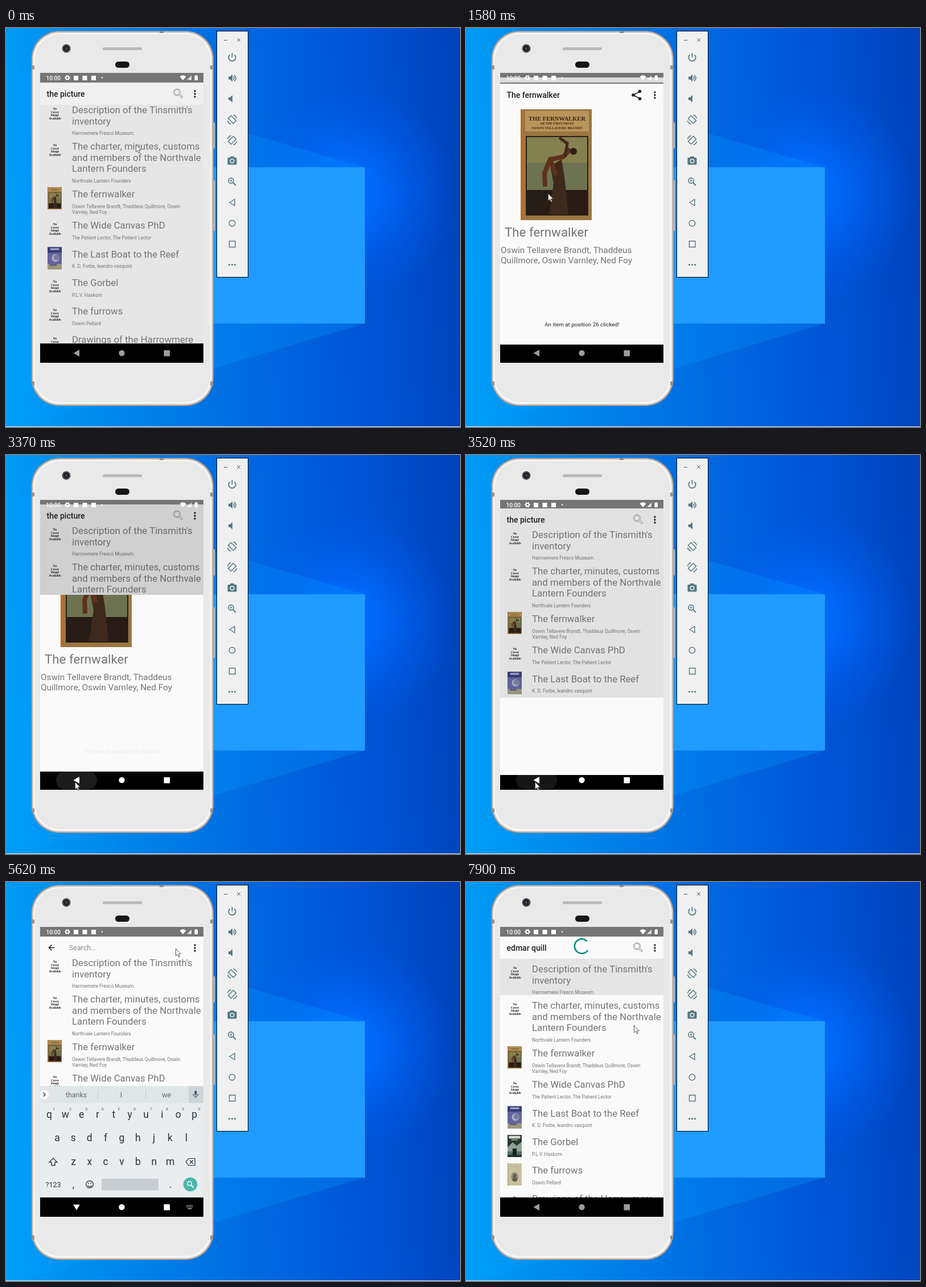
Animation, 798 px wide and 702 px high, one loop 8000 ms. Source, as an HTML page with a canvas:

```html
<!DOCTYPE html>
<html lang="en">
<head>
<meta charset="utf-8">
<title>Book search on a phone emulator</title>
<style>
  html, body { margin: 0; height: 100%; overflow: hidden; }
  canvas { display: block; }
</style>
</head>
<body>
<canvas id="stage" width="798" height="702"></canvas>
<script>
const stage = document.getElementById('stage');
let g = stage.getContext('2d');
const LOOP = 8000, TAU = Math.PI * 2;
const SANS = 'Roboto, sans-serif', SERIF = '"Liberation Serif", serif';
const GREY = '#757575', INK = '#212121', PAPER = '#fafafa', ICON = '#557783';

// Screen bursts: first change, last change, number of changes
const BURSTS = [[150, 630, 5], [1190, 1730, 5], [2030, 2980, 8], [3100, 4080, 8], [4200, 5110, 8],
  [5350, 5350, 1], [5620, 6650, 8], [6800, 7770, 7], [7900, 7900, 1]];
const POINTER = [[30, 228, 205], [630, 144, 291], [1900, 144, 291], [2300, 228, 400], [2660, 150, 545],
  [2830, 109, 591], [2980, 121, 575], [4090, 121, 575], [4460, 292, 114], [4590, 298, 117],
  [7150, 298, 117], [7770, 300, 244], [7900, 295, 252]];

// y is the centre of the first title line, relative to the scrolled list
const BOOKS = [
  { y: 142, title: ["Description of the Tinsmith's", 'inventory'], by: ['Harrowmere Fresco Museum.'] },
  { y: 206, title: ['The charter, minutes, customs', 'and members of the Northvale', 'Lantern Founders'], by: ['Northvale Lantern Founders'] },
  { y: 290, title: ['The fernwalker'], by: ['Oswin Tellavere Brandt, Thaddeus Quillmore, Oswin', 'Varnley, Ned Foy'], cover: 'hunter' },
  { y: 345, title: ['The Wide Canvas PhD'], by: ['The Patient Lector, The Patient Lector'] },
  { y: 395.5, title: ['The Last Boat to the Reef'], by: ['K. D. Forbe, leandro vasquint'], cover: 'moon' },
  { y: 446, title: ['The Gorbel'], by: ['P.L.V. Haskorn'], cover: 'forest', late: true },
  { y: 496, title: ['The furrows'], by: ['Oswin Pellard'], cover: 'portrait', late: true },
  { y: 546, title: ['Drawings of the Harrowmere'], by: [] },
];
const QUERY = 'edmar quill';

const ramp = (t, a, b) => Math.min(1, Math.max(0, (t - a) / (b - a)));
const inOut = p => p < .5 ? 4 * p ** 3 : 1 - 4 * (1 - p) ** 3;

function hold(t) {
  let held = 0;
  for (const [a, b, n] of BURSTS) {
    const step = (b - a) / (n - 1) || 1, late = t + 20 - a;
    if (late >= 0) held = Math.min(b, a + Math.floor(late / step) * step);
  }
  return held;
}

function along(keys, t) {
  const i = keys.findIndex(k => k[0] > t);
  if (i < 1) return keys.at(i).slice(1);
  const [a, x, y] = keys[i - 1], [b, u, v] = keys[i], p = ramp(t, a, b);
  return [Math.round(x + (u - x) * p), Math.round(y + (v - y) * p)];
}

function text(s, x, y, size, color = GREY, weight = 400, align = 'left', family = SANS) {
  g.font = `${weight} ${size}px ${family}`;
  g.fillStyle = color;
  g.textAlign = align;
  g.fillText(s, x, y);
}
function rect(x, y, w, h, color, r = 0) {
  g.fillStyle = color;
  g.beginPath(); g.roundRect(x, y, w, h, r); g.fill();
}
function disc(x, y, r, color, ry = r) {
  g.fillStyle = color;
  g.beginPath(); g.ellipse(x, y, r, ry, 0, 0, TAU); g.fill();
}
function fillPath(d, color) { g.fillStyle = color; g.fill(new Path2D(d)); }
function strokePath(d, color, width = 1.4) {
  g.strokeStyle = color; g.lineWidth = width; g.stroke(new Path2D(d));
}
function ring(x, y, r, color, width = 1.4, a = 0, b = TAU) {
  g.strokeStyle = color; g.lineWidth = width;
  g.beginPath(); g.arc(x, y, r, a, b); g.stroke();
}
function at(x, y, draw, sx = 1, sy = sx, turn = 0) {
  g.save(); g.translate(x, y); g.rotate(turn); g.scale(sx, sy); draw(); g.restore();
}
function clipped(x, y, w, h, draw) {
  g.save(); g.beginPath(); g.rect(x, y, w, h); g.clip(); draw(); g.restore();
}

function wallpaper() {
  const base = g.createLinearGradient(0, 430, 798, 390);
  [['0', '#009df5'], ['.3', '#0080e8'], ['.55', '#0068e0'], ['.8', '#0054d4'], ['1', '#0044bd']]
    .forEach(([p, c]) => base.addColorStop(+p, c));
  rect(0, 0, 798, 702, base);
  const glow = g.createRadialGradient(600, 290, 50, 600, 290, 190);
  glow.addColorStop(0, 'rgba(0,108,255,.85)');
  glow.addColorStop(1, 'rgba(0,90,240,0)');
  rect(300, 0, 498, 702, glow);
  fillPath('M630 245L0 62V702H20L630 520Z', 'rgba(0,155,255,.27)');
  rect(356, 245, 275, 275, '#209bff');
  rect(0, 701, 798, 1, '#e8f0f8');
}

function phoneBody() {
  rect(363, 166, 4, 46, '#c9c3c0', 1);
  rect(363, 268, 4, 89, '#c9c3c0', 1);
  rect(44.5, 5, 320.5, 660, '#a2948c', 49);
  rect(46, 6.5, 317.5, 657, '#d3c9c4', 48);
  rect(48, 8.5, 313.5, 653, '#f8f8f8', 46);
  rect(50.5, 11, 308.5, 647, '#e9e9e9', 44);
  rect(270, 5, 7, 4, '#8b8b8b');
  for (const y of [66, 622]) { rect(45, y, 5, 7, '#929292'); rect(359, y, 5, 7, '#929292'); }
  disc(106, 36, 7.5, '#4a4a4a'); disc(106, 36, 5, '#1d1d22'); disc(106, 36, 2, '#49506a');
  rect(170, 34, 69, 5, '#b9b9b9', 2.5);
  rect(192, 59, 25, 11, '#161616', 5.5);
}

function speaker(y, waves) {
  fillPath(`M391 ${y - 2.5}h3l4-4v13l-4-4h-3z`, ICON);
  if (waves) { ring(398, y, 3, ICON, 1.6, -1, 1); ring(398, y, 6, ICON, 1.6, -1.1, 1.1); }
}
function rotateIcon(y, mirror) {
  at(397.5, y, () => {
    strokePath('M-7-2L-2-7L7 2L2 7Z', ICON, 1.5);
    strokePath('M-8 2A8 8 0 0 0-2 8M2-8A8 8 0 0 1 8-2', ICON, 1.4);
  }, mirror, 1);
}
function emulatorBar() {
  rect(370, 5, 56, 434, '#000');
  rect(371, 6, 54, 432, '#f0f0f0');
  strokePath('M383 21.5h6M406 18l6 6m0-6l-6 6', '#555', 1);
  ring(397.5, 52, 6.2, ICON, 1.8, -.9, Math.PI + .9);
  strokePath('M397.500 44v7.500', ICON, 1.8);
  speaker(88, true); speaker(124.5, false);
  rotateIcon(161, 1); rotateIcon(197.5, -1);
  rect(389.5, 228, 16, 12.5, ICON, 1.5); rect(394, 226, 7, 3, ICON);
  disc(397.5, 234, 4, '#f0f0f0'); disc(397.5, 234, 2.5, ICON);
  ring(395.5, 268.5, 4.6, ICON, 1.6);
  strokePath('M399 272l5 5', ICON, 2);
  strokePath('M393 268.5h5m-2.5-2.5v5', ICON, 1);
  strokePath('M402 301.5v11l-9-5.5z', ICON);
  ring(397.5, 343.5, 5.3, ICON);
  strokePath('M392.500 375h10.500v10.500h-10.500z', ICON);
  for (const x of [392.5, 397.5, 402.5]) disc(x, 416.5, 1.6, ICON);
}

// Covers are drawn in a 125 x 195 box
const covers = {
  hunter() {
    rect(0, 0, 125, 195, '#9a7642'); rect(0, 0, 4, 195, '#b96f24'); rect(8, 3, 112, 36, '#b8955a');
    text('THE FERNWALKER', 64, 20, 10.5, '#3c2814', 700, 'center', SERIF);
    text('OR THE FIRST FROST', 64, 26.5, 5.6, '#3c2814', 700, 'center', SERIF);
    text('OSWIN TELLAVERE BRANDT', 64, 34.5, 6.3, '#3c2814', 700, 'center', SERIF);
    rect(9, 47, 110, 140, '#2a2016'); rect(11, 49, 106, 136, '#85814f');
    rect(11, 94, 106, 50, '#6d7350'); rect(11, 142, 106, 43, '#281c16');
    fillPath('M52 100L72 88L78 125L84 185H50L58 130Z', '#3f291b');
    strokePath('M88 70L74 84L52 88L42 112L43 136M52 88L62 116', '#5f311d', 8);
    strokePath('M78 84L82 60L68 50', '#432719', 5);
    disc(93, 74, 6, '#2c1b15');
  },
  moon() {
    rect(0, 0, 125, 195, '#62639d'); rect(0, 0, 125, 48, '#383b73'); rect(24, 10, 78, 16, '#a4a7c8');
    disc(70, 96, 34, '#a6a9bd'); disc(80, 90, 25, '#777c9d');
    rect(0, 150, 125, 45, '#9d987a'); rect(20, 150, 60, 15, '#555a84');
  },
  forest() {
    rect(0, 0, 125, 195, '#28362d'); rect(12, 8, 100, 24, '#d4d8cc'); rect(32, 38, 60, 10, '#98a697');
    fillPath('M0 110L45 65L80 95L125 60V150H0Z', '#8fa097');
    rect(0, 145, 125, 30, '#566e62'); rect(45, 120, 35, 60, '#17241e');
  },
  portrait() {
    rect(0, 0, 125, 195, '#c9c0a1'); rect(0, 0, 8, 195, '#ada383'); rect(25, 25, 75, 4, '#a2987b');
    disc(63, 120, 32, '#938b75', 42); disc(63, 110, 13, '#625d51', 17); disc(63, 142, 22, '#625d51', 17);
  },
};
function cover(name, x, y, scale) { at(x, y, covers[name], scale); }

function overflowDots() { for (const y of [111, 116, 121]) disc(332, y, 1.7, INK); }

function toolbar(t, color) {
  const searching = t >= 4590 && t < 7250;
  rect(60, 96, 287, 39, color);
  overflowDots();
  if (!searching) {
    text(t < 4590 ? 'the picture' : QUERY, 71.5, 121, 14, INK, 500);
    ring(300.5, 113, 5.2, '#888', 2.4); ring(300.5, 113, 5.2, '#ededed', 1);
    strokePath('M304.500 117l5.500 5.500', '#888', 3.6); strokePath('M304.500 117l5 5', '#ededed', 2);
    return;
  }
  strokePath('M85.500 115.500H76M80.500 110.500l-5 5l5 5', INK, 1.6);
  const typed = queryAt(t);
  if (!typed) text('Search…', 110.5, 120, 12.6, '#8b8b8b');
  text(typed, 110.5, 120, 12.6, INK);
  const end = 110.5 + g.measureText(typed).width;
  if (typed) {
    const from = 110.5 + g.measureText(typed.slice(0, typed.lastIndexOf(' ') + 1)).width;
    rect(from, 121.5, end - from, 1, INK);
    strokePath('M295 111l9 9m0-9l-9 9', INK, 1.7);
  }
  if (t < 5350 || t > 5700) rect(end, 107, 1.5, 17, '#26a69a');
}

function queryAt(t) { return QUERY.slice(0, Math.floor(ramp(t, 5620, 6650) * QUERY.length)); }

function bookRow(book, shift, t) {
  const y = book.y + shift;
  book.title.forEach((s, i) => text(s, 116, y + 6 + i * 19.5, 16.75));
  const below = y + 24.5 + (book.title.length - 1) * 19.5;
  book.by.forEach((s, i) => text(s, 116, below + i * 10, 8.4));
  if (book.cover && (!book.late || t > 380)) return cover(book.cover, 73, y - 12, .2);
  ['No', 'Cover', 'Image', 'Available'].forEach((s, i) =>
    text(s, 86, y + i * 5.7, 5.4, INK, 700, 'center', SERIF));
}

function listWindow(t, dy, dim) {
  const grey = t < 4580;
  const shift = t > 7250 ? 11 : 2 * (1 - ramp(t, 30, 630));
  at(0, dy, () => {
    rect(60, 79, 287, 17, GREY);
    rect(60, 96, 287, 490, grey ? '#e6e6e6' : PAPER);
    clipped(60, 135, 287, 451, () => {
      if (t > 7250) rect(60, 135, 287, 64, '#e5e5e5');
      BOOKS.forEach(book => bookRow(book, shift, t));
    });
    toolbar(t, t < 3100 ? '#f0f0f0' : t < 4200 ? '#e6e6e6' : PAPER);
  });
  if (dim) rect(60, 79 + Math.max(0, 17 + dy), 287, 510, `rgba(0,0,0,${dim})`);
}

function detailWindow(dy) {
  at(0, dy, () => {
    rect(60, 79, 287, 476, PAPER);
    rect(60, 79, 287, 17, dy ? '#dcdcdc' : GREY);
    if (dy) rect(60, 94, 287, 2, GREY);
    text('The fernwalker', 71.5, 121, 14, INK, 500);
    strokePath('M306 109.500L294 116L306 122.500', INK, 1.8);
    disc(305.5, 109.5, 2.8, INK); disc(294, 116, 2.8, INK); disc(305.5, 122.5, 2.8, INK);
    overflowDots();
    cover('hunter', 96, 141, 1);
    text('The fernwalker', 68, 365, 22.3);
    text('Oswin Tellavere Brandt, Thaddeus', 61, 393.5, 15.36);
    text('Quillmore, Oswin Varnley, Ned Foy', 61, 411.5, 15.36);
  });
}

function suggestions(t) {
  const word = queryAt(t).split(' ').pop();
  if (!word) return ['thanks', 'I', 'we'];
  return [word, word[0].toUpperCase() + word.slice(1), t > 6600 ? 'quilting' : word + 's'];
}

function keyboard(t, dy) {
  const ink = '#263238';
  const key = (s, x, y, size = 17.5) => text(s, x, y, size, ink, 400, 'center');
  at(0, dy, () => {
    rect(60, 359, 287, 196, '#e9edf0');
    rect(60, 359, 287, 30, '#e0e5e8'); rect(321, 359, 26, 30, '#ced5d9');
    disc(67, 374, 8, '#fff'); strokePath('M65.500 370.500l3.500 3.500l-3.500 3.500', ink);
    suggestions(t).forEach((s, i) => text(s, [123.5, 202.5, 282][i], 378.5, 12.4, '#5f6a70', 400, 'center'));
    rect(161, 366, 1, 17, '#c3cacd'); rect(245, 366, 1, 17, '#c3cacd');
    rect(331.3, 367, 4, 8, '#455a64', 2);
    strokePath('M329 373a4.300 4.300 0 0 0 8.600 0M333.300 377.500v3', '#455a64', 1.2);
    [['qwertyuiop', 76, 415], ['asdfghjkl', 90, 456], ['zxcvbnm', 118.5, 498]].forEach(([keys, x, y]) =>
      [...keys].forEach((k, i) => key(k, x + i * 28.35, y)));
    [...'1234567890'].forEach((n, i) => text(n, 84.5 + i * 28.35, 402, 7, '#5f6a70', 400, 'center'));
    strokePath('M83 486l-7 7h4v5.500h6v-5.500h4z', ink, 1.3);
    strokePath('M316 492.500l5-6h11v12h-11zM323 489.500l6 6m0-6l-6 6', ink, 1.2);
    key('?123', 83, 536.5, 12.5); key(',', 118.5, 538); key('.', 289, 538);
    ring(147, 532, 6.3, ink, 1.2); ring(147, 533, 3.2, ink, 1.2, .2, 2.9);
    disc(144.7, 530, 1, ink); disc(149.3, 530, 1, ink);
    rect(168, 522, 100, 20.5, '#c8cdd1', 2);
    disc(324, 532, 12.3, '#4db6ac');
    ring(322.5, 530.5, 3.6, '#fff', 1.6); strokePath('M325 533l4.500 4.500', '#fff', 1.8);
  });
}

function statusIcons() {
  text('10:00', 70.5, 91.5, 10, '#fff', 500);
  ring(108, 87.5, 2.8, '#fff', 2);
  for (let i = 0; i < 6; i++) at(108, 87.5, () => rect(3, -.9, 1.7, 1.8, '#fff'), 1, 1, i * TAU / 6);
  rect(119, 84, 8, 8, '#fff'); rect(134.5, 84, 8, 8, '#fff'); rect(150, 84, 8, 8, '#fff');
  disc(169, 87.5, 1.2, '#fff');
  fillPath('M305.500 85.500Q311 81 316.500 85.500L311 92Z', '#fff');
  fillPath('M326 83.500V91.500H318Z', 'rgba(255,255,255,.8)');
  rect(331.5, 84, 5.5, 8, '#fff', 1); rect(333, 83, 2.5, 2, '#fff');
}

function navIcons(t, typing) {
  const color = t >= 3100 && t < 5900 ? '#fff' : '#9c9c9c';
  if (t >= 3100 && t < 3950) rect(88, 557, 72, 31, `rgba(255,255,255,${.11 * (1 - ramp(t, 3400, 3950))})`, 15);
  fillPath(typing ? 'M118 567.500h12l-6 10z' : 'M129 566v12l-10.500-6z', color);
  disc(203.5, 572, 5.2, color);
  rect(277.5, 567, 10.5, 10.5, color);
  if (!typing) return;
  for (let i = 0; i < 10; i++) rect(317.5 + i % 5 * 2.3, 568.5 + Math.floor(i / 5) * 2.5, 1.4, 1.4, '#ccc');
  rect(319.5, 574, 7, 1.4, '#ccc');
}

function spinner(t) {
  const start = .6 + (t - 7900) * .007, sweep = 4.95 + (t - 7900) * .004;
  disc(203.5, 113, 15, PAPER);
  ring(203.5, 113, 12.7, '#00897b', 2.6, start, start + sweep);
}

function screen(t) {
  rect(60, 79, 287, 510, '#000');
  const open = ramp(t, 1320, 1730), close = ramp(t, 3250, 3675);
  const away = open && close < 1;
  const left = (1 - open) ** 2, back = inOut(close);
  const dy = Math.round(21 * (close ? close ** 2 : open ? left : 0));

  clipped(60, 79, 287, 476, () => {
    if (!away) listWindow(t, 0, 0);
    else {
      const lift = close ? 1 - back : 1 - left;
      listWindow(t, -Math.round(10.5 * lift), .11 * lift);
    }
  });
  if (away) {
    const top = Math.round(79 + 476 * (close ? Math.min(1, close * 1.15) : left ** 2 + (open < 1 ? .008 : 0)));
    clipped(60, top, 287, Math.max(0, 555 + dy - top), () => detailWindow(dy));
  }

  const up = ramp(t, 4640, 4980) * (1 - ramp(t, 7130, 7440));
  if (up) clipped(60, 96, 287, 459, () => keyboard(t, 196 * (1 - up) ** 2));
  if (t > 7400) spinner(t);
  g.globalAlpha = ramp(t, 1190, 1460) * (1 - ramp(t, 3100, 3400));
  text('An item at position 26 clicked!', 203.7, 525, 9.8, INK, 400, 'center');
  g.globalAlpha = 1;
  statusIcons();
  navIcons(t, up > .3);
}

function pointer(t) {
  at(...along(POINTER, t), () => {
    const arrow = 'M.5.500V13l2.800-2.600l2 4.600l2-.900l-2-4.500h3.900z';
    fillPath(arrow, '#fff');
    strokePath(arrow, '#444', .9);
  });
}

const backdrop = document.createElement('canvas');
backdrop.width = 798; backdrop.height = 702;
const front = g;
g = backdrop.getContext('2d');
wallpaper(); phoneBody(); emulatorBar();
g = front;

const began = performance.now();
function frame() {
  const t = hold((performance.now() - began) % LOOP);
  g.drawImage(backdrop, 0, 0);
  clipped(60, 79, 287, 510, () => screen(t));
  pointer(t);
  requestAnimationFrame(frame);
}
frame();
</script>
</body>
</html>
```
